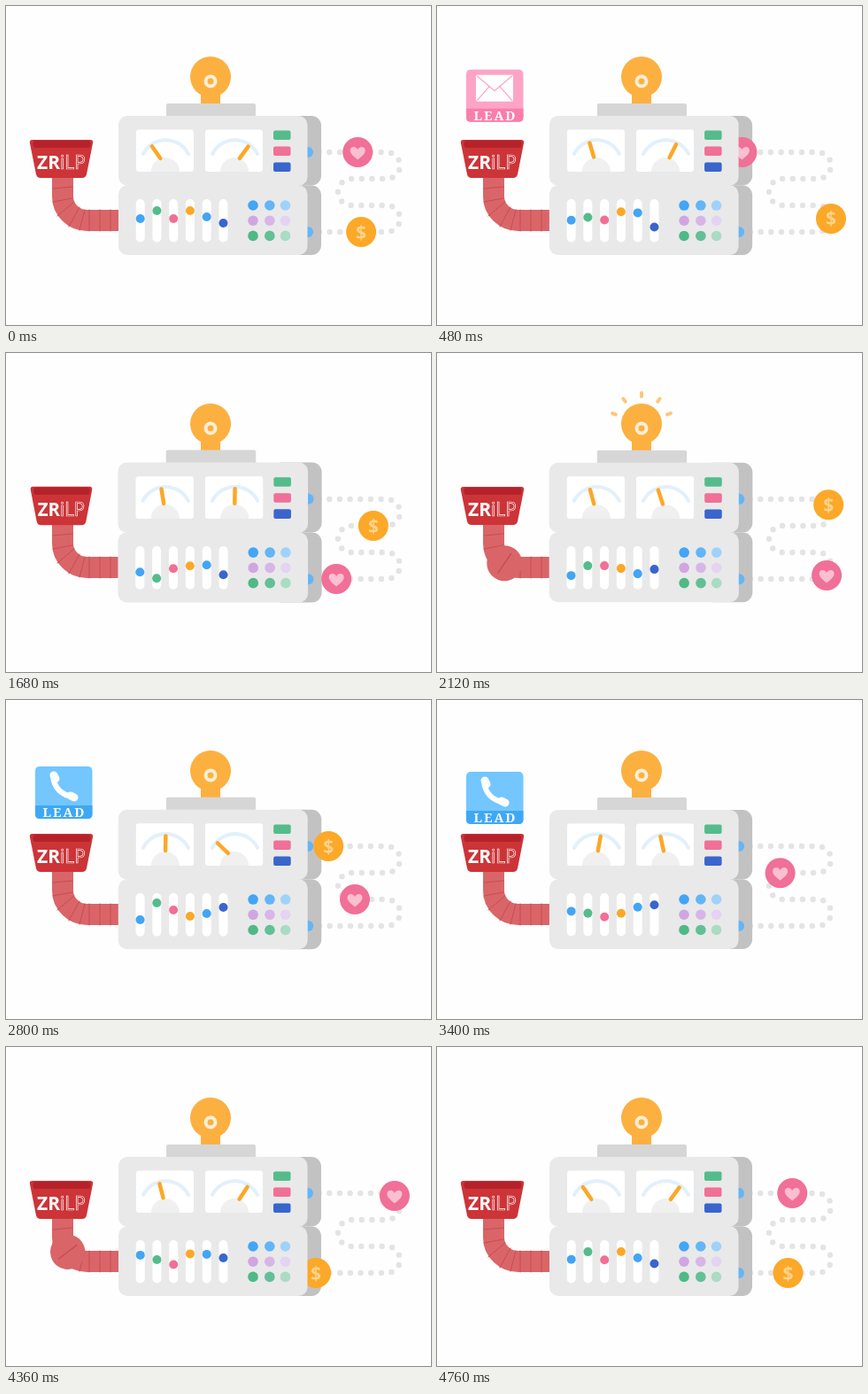
Animation, 480 px wide and 360 px high, one loop 4800 ms. Source, as an HTML page:

```html
<!DOCTYPE html>
<html lang="en">
<head>
<meta charset="utf-8">
<title>Lead machine</title>
<style>
  html, body { margin: 0; width: 100%; height: 100%; overflow: hidden; background: #fefefe; }
  svg { display: block; width: 100vw; height: 100vh; }
  .brand { font: 700 21px "Open Sans", sans-serif; fill: #fff; }
  .brand .thin { font-weight: 400; fill: none; stroke: #fff; stroke-width: .7; }
  .label { font: 900 14.5px "Noto Serif", serif; letter-spacing: 2px; fill: #fff; text-anchor: middle; }
  .dollar { font: 700 21px "Open Sans", sans-serif; fill: #fdd48d; text-anchor: middle; }
  .line { fill: none; stroke-linecap: round; stroke-linejoin: round; }
</style>
</head>
<body>
<svg viewBox="0 0 480 360">
  <defs>
    <clipPath id="slot"><path d="M0 0H130V157H0Z"/></clipPath>
  </defs>

  <g id="pipe">
    <path d="M64 190V215A28 27 0 0 0 92 242H135" fill="none" stroke="#d96569" stroke-width="24"/>
    <path class="line" stroke="#c94c51" stroke-width="1"
      d="M53 206L75 204M53 221L75 217M58 237L77 221M71 249L83 227M83 253L89 230M94 230V254M106 230V254M118 230V254"/>
    <g id="bulges"></g>
  </g>

  <g id="funnel">
    <path d="M30 151H95Q99 151 98 155L91 190Q90 194 86 194H39Q35 194 34 190L27 155Q26 151 30 151Z" fill="#cc3438"/>
    <rect x="30.500" y="152" width="65" height="8" rx="3" fill="#b5222a"/>
    <text class="brand" x="35" y="184">ZR<tspan class="thin">iLP</tspan></text>
  </g>

  <g clip-path="url(#slot)">
    <g id="mail">
      <rect x="33" y="81" width="64.500" height="59" rx="5" fill="#fd9cc0"/>
      <path d="M33 125H97.500V135Q97.500 140 92.500 140H38Q33 140 33 135Z" fill="#f973a3"/>
      <rect x="44" y="87" width="42" height="30" rx="1" fill="#fff"/>
      <path class="line" stroke="#fd9cc0" stroke-width="1.200" d="M45 88L65 105L85 88M45 116L59 100M85 116L71 100"/>
      <text class="label" x="66" y="138">LEAD</text>
    </g>
    <g id="call">
      <rect x="33" y="81" width="64.500" height="59" rx="5" fill="#74c6ff"/>
      <path d="M33 125H97.500V135Q97.500 140 92.500 140H38Q33 140 33 135Z" fill="#3fa8f4"/>
      <g class="line" stroke="#fff">
        <path stroke-width="6" d="M53 92Q55 112 77 116"/>
        <path stroke-width="9" d="M54 91L56 95M73 114L77 116"/>
      </g>
      <text class="label" x="66" y="138">LEAD</text>
    </g>
  </g>

  <g id="rays" class="line" stroke="#fdc876" stroke-width="4"></g>
  <g fill="#fcb040">
    <circle cx="231" cy="80" r="23"/>
    <path d="M220 95H242V112H220Z"/>
  </g>
  <circle id="ring" cx="231" cy="85" r="5.500" fill="none" stroke="#fdefd6" stroke-width="4"/>

  <path id="track" class="line" d="M320 255H430A15 15 0 0 0 430 225H390A15 15 0 0 1 390 195H430A15 15 0 0 0 430 165H320"/>
  <path class="line" stroke="#e4e4e4" stroke-width="6.400" stroke-dasharray="0 11.650"
    d="M354 255H430A15 15 0 0 0 430 225H390A15 15 0 0 1 390 195H430A15 15 0 0 0 430 165H353"/>

  <g class="machine">
    <path d="M183 110H280Q282 110 282 112V126H181V112Q181 110 183 110Z" fill="#d6d6d6"/>
    <g fill="#c2c2c2">
      <rect x="300" y="124" width="56" height="78.500" rx="11"/>
      <rect x="300" y="202.500" width="56" height="78.500" rx="11"/>
    </g>
    <g fill="#64b5f6">
      <circle cx="341" cy="165" r="6"/>
      <circle cx="341" cy="255" r="6"/>
    </g>
  </g>

  <g id="heart">
    <circle r="17" fill="#f07097"/>
    <path d="M0 8.500C-4 5-8.500 2-8.500-2C-8.500-7-2-7.500 0-3C2-7.500 8.500-7 8.500-2C8.500 2 4 5 0 8.500Z" fill="#fabfd1"/>
  </g>
  <g id="coin">
    <circle r="17" fill="#fca828"/>
    <text class="dollar" y="7.500">$</text>
  </g>

  <g class="machine">
    <g fill="#e9e9e9">
      <rect x="127" y="124" width="213.500" height="78.800" rx="10"/>
      <rect x="127" y="202.200" width="213.500" height="78.800" rx="10"/>
      <path d="M137 195H330V210H137Z"/>
    </g>
    <g id="panel"></g>
  </g>
</svg>

<script>
const LOOP = 4800;
const CARD_GAP = 2300;
const $ = id => document.getElementById(id);

function add(parent, tag, attrs) {
  const el = document.createElementNS('http://www.w3.org/2000/svg', tag);
  for (const key in attrs) el.setAttribute(key, attrs[key]);
  return parent.appendChild(el);
}

// Straight steps between [time, value] pairs, clamped at both ends.
function steps(keys, t) {
  if (t <= keys[0][0]) return keys[0][1];
  for (let i = 1; i < keys.length; i++) {
    const [a, x] = keys[i - 1], [b, y] = keys[i];
    if (t <= b) return x + (y - x) * (t - a) / (b - a);
  }
  return keys[keys.length - 1][1];
}

// Smooth closed curve through one value per beat.
const BEATS = [0, 960, 1680, 2120, 2800, 3920];
function wave(values, t) {
  const n = BEATS.length;
  const at = i => BEATS[(i + n) % n] + LOOP * Math.floor(i / n);
  const val = i => values[(i + n) % n];
  const slope = i => (val(i + 1) - val(i - 1)) / (at(i + 1) - at(i - 1));
  let i = n - 1;
  while (BEATS[i] > t) i--;
  const d = at(i + 1) - at(i), u = (t - at(i)) / d, v = 1 - u;
  return v * v * (1 + 2 * u) * val(i) + u * u * (3 - 2 * u) * val(i + 1)
    + d * u * v * (v * slope(i) - u * slope(i + 1));
}

const BLUE = '#42a5f5', GREEN = '#54bc8b', PINK = '#f07097', ORANGE = '#fba828', NAVY = '#3965cd';
const panel = $('panel');

const gauges = [
  { x: 180, angles: [-35, 6, -9, -15, 1, 10] },
  { x: 258, angles: [36, 14, 1, -18, -46, 21] }
];
for (const g of gauges) {
  add(panel, 'rect', { x: g.x - 33, y: 139.5, width: 65, height: 47.5, rx: 3, fill: '#fff' });
  add(panel, 'path', { class: 'line', d: `M${g.x - 25} 167A28.500 28.500 0 0 1 ${g.x + 26} 167`, stroke: '#e2f0fc', 'stroke-width': 4 });
  add(panel, 'path', { d: `M${g.x - 16} 187A16 16 0 0 1 ${g.x + 16} 187Z`, fill: '#f0f0f0' });
  g.el = add(panel, 'path', { class: 'line', d: 'M0-10V-26.500', stroke: ORANGE, 'stroke-width': 4.5 });
}

[GREEN, PINK, NAVY].forEach((fill, i) =>
  add(panel, 'rect', { x: 302, y: 140.5 + 18 * i, width: 19.5, height: 10.5, rx: 2, fill }));

const sliders = [
  { fill: BLUE, ys: [240, 243, 247, 251, 248, 232] },
  { fill: GREEN, ys: [231, 249, 254, 240, 229, 249] },
  { fill: PINK, ys: [240, 244, 243, 240, 237, 250] },
  { fill: ORANGE, ys: [231, 235, 240, 243, 244, 237] },
  { fill: BLUE, ys: [238, 229, 239, 249, 241, 230] },
  { fill: NAVY, ys: [245, 252, 250, 244, 234, 232] }
];
sliders.forEach((s, i) => {
  const x = 151.7 + 18.75 * i;
  add(panel, 'rect', { x: x - 5, y: 218, width: 10, height: 48.5, rx: 5, fill: '#fff' });
  s.el = add(panel, 'circle', { cx: x, r: 5, fill: s.fill });
});

[BLUE, '#62b5f7', '#9fd2fa', '#d0a6e2', '#d8b5e8', '#e4d3f3', '#4fb985', '#62c096', '#a9dcc3']
  .forEach((fill, i) => add(panel, 'circle', {
    cx: [279, 297.8, 315.5][i % 3], cy: 225 + 17.2 * Math.floor(i / 3), r: 5.8, fill
  }));

const rays = [-70, -36, 0, 36, 70].map(angle => {
  const g = add($('rays'), 'g', { transform: `translate(231 80) rotate(${angle})` });
  return add(g, 'path', { d: 'M0-31V-35' });
});

const bulges = [0, 1].map(() => {
  const g = add($('bulges'), 'g', {});
  add(g, 'circle', { r: 20, fill: '#d96569' });
  add(g, 'path', { class: 'line', d: 'M0-13V13', stroke: '#c94c51', 'stroke-width': 1.5 });
  return g;
});

const cards = [$('mail'), $('call')];
const cardY = [[380, -25], [540, 0], [1150, 0], [1240, -22], [1310, -28], [1390, -15], [1530, 82]];
const cardFade = [[380, 0], [490, 1], [1530, 1], [1531, 0]];
const squash = [[1390, 0], [1500, 4], [1600, -2.5], [1760, .7], [1850, 0]];
const flashes = [[800, 900, 980, 1120], [1960, 2060, 2160, 2330], [3600, 3700, 3820, 4020]];
const ringFade = [[600, 1], [700, 0], [1200, 0], [1300, 1]];
const swell = [0, .5, 1, .6, .4, 0];

const coinPath = [[-690, -22], [0, 58], [960, 163], [1680, 246], [2120, 294], [2800, 374], [3180, 418]];
const heartPath = [[1340, -22], [1680, 30], [2120, 98], [2800, 170], [3920, 261], [4480, 309], [4800, 341], [5500, 418]];

const track = $('track');
function place(el, keys, t) {
  const p = track.getPointAtLength(steps(keys, t) + 23);
  el.setAttribute('transform', `translate(${p.x} ${p.y})`);
}

// Down the pipe, round the elbow, then right into the machine.
function moveBulge(el, t) {
  const u = (t - 1800) / 640;
  el.style.display = u > 0 && u < 1 ? '' : 'none';
  if (u <= 0 || u >= 1) return;
  const s = 95 * u - 12;
  const a = Math.min(1, Math.max(0, (s - 9) / 43)) * Math.PI / 2;
  const x = 92 - 28 * Math.cos(a) + Math.max(0, s - 52);
  const y = 215 + 27 * Math.sin(a) + Math.min(0, s - 9);
  const k = .6 + .4 * Math.sin(Math.PI * u);
  el.setAttribute('transform', `translate(${x} ${y}) rotate(${90 - a * 180 / Math.PI}) scale(${k})`);
}

function draw(t) {
  for (const g of gauges)
    g.el.setAttribute('transform', `translate(${g.x} 180) rotate(${wave(g.angles, t)})`);
  for (const s of sliders) s.el.setAttribute('cy', wave(s.ys, t));

  let wide = 0;
  cards.forEach((card, i) => {
    const local = (t - CARD_GAP * i + LOOP) % LOOP;
    card.setAttribute('transform', `translate(0 ${steps(cardY, local)})`);
    card.style.opacity = steps(cardFade, local);
    wide += steps(squash, local);
    moveBulge(bulges[i], local);
  });
  $('funnel').setAttribute('transform',
    `translate(62.500 172) scale(${1 + wide / 35.5} ${1 - wide / 120}) translate(-62.500 -172)`);

  const glow = Math.max(...flashes.map(([a, b, c, d]) => steps([[a, 0], [b, 1], [c, 1], [d, 0]], t)));
  $('rays').style.opacity = glow;
  for (const ray of rays) ray.setAttribute('transform', `translate(0 ${4 * (1 - glow)})`);
  $('ring').style.opacity = steps(ringFade, t);

  const k = 1 + .005 * wave(swell, t);
  for (const part of document.querySelectorAll('.machine'))
    part.setAttribute('transform', `translate(234 203) scale(${k}) translate(-234 -203)`);

  place($('coin'), coinPath, t < 3600 ? t : t - LOOP);
  place($('heart'), heartPath, t < 1200 ? t + LOOP : t);
}

const start = performance.now();
function tick() {
  draw((performance.now() - start) % LOOP);
  requestAnimationFrame(tick);
}
tick();
</script>
</body>
</html>
```
